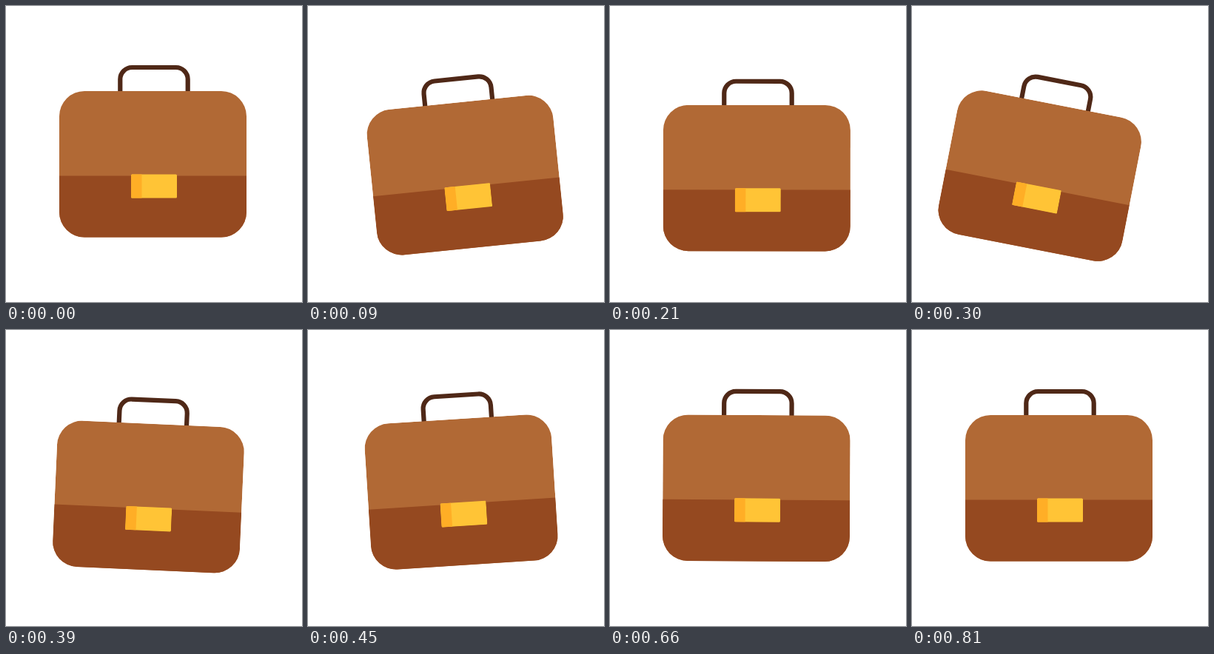
An HTML page for the animation above (2.84 s loop, 400x400 px).

```html
<!DOCTYPE html>
<html lang="en">
<head>
<meta charset="utf-8">
<title>Swinging briefcase</title>
<style>
  html, body { margin: 0; height: 100%; overflow: hidden; background: #fff; }
  svg { display: block; width: 100%; height: 100%; }
</style>
</head>
<body>
<svg viewBox="0 0 400 400">
  <defs>
    <clipPath id="body"><rect x="72" y="115" width="253" height="197.5" rx="34"/></clipPath>
    <clipPath id="clasp"><rect x="169" y="227.5" width="62" height="32" rx="1.5"/></clipPath>
  </defs>
  <g id="bag">
    <path d="M154.3 118V99a16 16 0 0 1 16-16h59.4a16 16 0 0 1 16 16v19" fill="none" stroke="#4f2817" stroke-width="6.2"/>
    <g clip-path="url(#body)">
      <path d="M72 115h253v198H72z" fill="#b16935"/>
      <path d="M72 229.5h253v84H72z" fill="#954920"/>
    </g>
    <g clip-path="url(#clasp)">
      <path d="M169 227h62v33h-62z" fill="#ffc436"/>
      <path d="M169 227h14.5v33H169z" fill="#ffae26"/>
    </g>
  </g>
</svg>
<script>
  const LOOP = 2840, STEP = 30, LAST = 27;
  // Keys are [step, value], eased in and out between neighbours.
  const swing = [[0, 0], [4.95, -8.9], [9.4, 11.4], [16.3, -5.2], [19.2, 1.9], [24.3, -0.9], [LAST, 0]];
  const drop = [[0, 0], [4.1, 18.8], [9.5, 18.8], [18, 0], [LAST, 0]];
  const bag = document.getElementById('bag');
  const start = performance.now();

  function valueAt(keys, step) {
    const i = Math.max(1, keys.findIndex(key => key[0] >= step));
    const [t0, v0] = keys[i - 1], [t1, v1] = keys[i];
    const p = (step - t0) / (t1 - t0);
    return v0 + (v1 - v0) * p * p * (3 - 2 * p);
  }

  function draw() {
    const time = (performance.now() - start) % LOOP;
    const step = Math.min(LAST, Math.floor(time / STEP));
    bag.setAttribute('transform',
      `translate(0 ${valueAt(drop, step)}) rotate(${valueAt(swing, step)} 200 79)`);
    requestAnimationFrame(draw);
  }
  draw();
</script>
</body>
</html>
```
